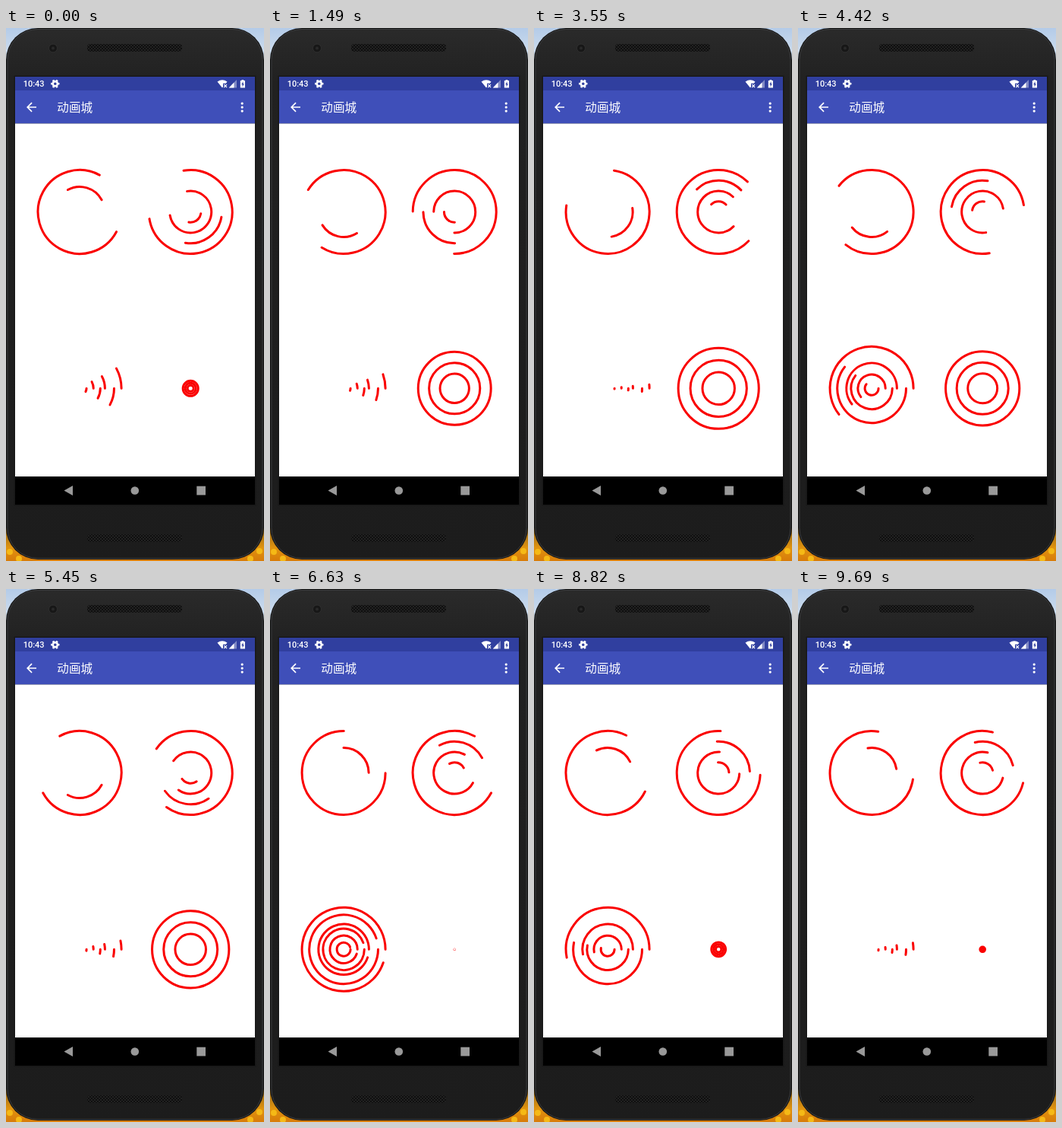
Write an HTML page that moves like this. It is 340 px wide and 700 px high and loops after 9790 ms.

```html
<!DOCTYPE html>
<html lang="zh">
<head>
<meta charset="utf-8">
<title>动画城</title>
<style>
  html, body { margin: 0; width: 100%; height: 100%; overflow: hidden; }
  svg { display: block; width: 340px; height: 700px; }
</style>
</head>
<body>
<svg viewBox="0 0 340 700" xmlns="http://www.w3.org/2000/svg">
  <defs>
    <linearGradient id="backdrop" x1="0" y1="0" x2="0" y2="1">
      <stop offset="0" stop-color="#b4cbe8"/>
      <stop offset=".06" stop-color="#d3e0ee"/>
      <stop offset=".93" stop-color="#7d5a1c"/>
      <stop offset=".975" stop-color="#e0930f"/>
      <stop offset="1" stop-color="#d87c0a"/>
    </linearGradient>
    <linearGradient id="shell" x1="0" y1="0" x2="0" y2="1">
      <stop offset="0" stop-color="#2a2a2a"/>
      <stop offset=".1" stop-color="#212121"/>
      <stop offset="1" stop-color="#1c1c1c"/>
    </linearGradient>
    <pattern id="mesh" width="4" height="4" patternUnits="userSpaceOnUse">
      <rect width="4" height="4" fill="#222"/>
      <circle cx="1" cy="1" r="1" fill="#080808"/>
      <circle cx="3" cy="3" r="1" fill="#080808"/>
    </pattern>
  </defs>

  <rect width="340" height="700" fill="url(#backdrop)"/>
  <g fill="#f5b916">
    <circle cx="5" cy="688" r="4"/><circle cx="17" cy="697" r="4"/>
    <circle cx="334" cy="687" r="4"/><circle cx="322" cy="697" r="4"/>
  </g>
  <rect x="0" y="0" width="340" height="698" rx="42" fill="#161616"/>
  <rect x="2" y="1.5" width="336" height="695" rx="40" fill="url(#shell)" stroke="#3b3c3e"/>
  <rect x="10.5" y="62.5" width="319" height="565" fill="#181818"/>
  <rect x="107" y="21" width="125" height="10" rx="4" fill="url(#mesh)"/>
  <rect x="107" y="665" width="125" height="10" rx="4" fill="url(#mesh)"/>
  <circle cx="62" cy="26.5" r="5.5" fill="#171717" stroke="#303030"/>
  <circle cx="62" cy="26.5" r="2" fill="#292929"/>

  <rect x="12" y="64" width="316" height="18.5" fill="#303f9f"/>
  <rect x="12" y="82" width="316" height="43.5" fill="#3f4fb9"/>
  <rect x="12" y="125.5" width="316" height="464" fill="#fff"/>
  <rect x="12" y="589" width="316" height="37" fill="#000"/>

  <g fill="#fff">
    <text x="22.7" y="77.2" font-size="11" font-weight="500" font-family="Roboto, sans-serif">10:43</text>
    <text x="67.3" y="109.7" font-size="15.6" font-family="'Noto Sans CJK SC', 'Noto Sans CJK', sans-serif">动画城</text>
    <circle cx="64.8" cy="73.2" r="3.1" fill="none" stroke="#fff" stroke-width="2.6"/>
    <circle cx="64.8" cy="73.2" r="4.8" fill="none" stroke="#fff" stroke-width="1.8"
      pathLength="12" stroke-dasharray="1" stroke-dashoffset=".5"/>
    <path d="M278.5 70.5Q285 66 291.5 70.5L289.8 72.8H286V77.2L285 78.5Z"/>
    <path d="M287.3 74.2L291 78M291 74.2L287.3 78" stroke="#fff" stroke-width="1.2"/>
    <path d="M304 68V78.5H293.8Z" opacity=".4"/>
    <path d="M300.5 71.6V78.5H293.8Z"/>
    <path d="M310.5 68H313.2V69H315V78.5H308.8V69H310.5Z"/>
    <path d="M312.5 70.3L310.2 74.3H311.6V77.2L313.8 73.2H312.5Z" fill="#303f9f"/>
    <path transform="translate(23.8 94.3) scale(.81)"
      d="M20 11H7.83l5.59-5.59L12 4l-8 8 8 8 1.41-1.41L7.83 13H20z"/>
    <circle cx="311.2" cy="99.1" r="1.65"/>
    <circle cx="311.2" cy="104.1" r="1.65"/>
    <circle cx="311.2" cy="109.1" r="1.65"/>
  </g>
  <g fill="#999">
    <path d="M76.5 607.5L88 601V614Z"/>
    <circle cx="169.8" cy="607.5" r="5.3"/>
    <rect x="251.3" y="601.7" width="11.7" height="11.7"/>
  </g>
  <g id="stage" fill="none" stroke="#fa0000" stroke-width="3" stroke-linecap="round"></g>
</svg>
<script>
const LOOP = 9790;
const SIZE = 55;
const LEFT = 97.1, RIGHT = 243.2, TOP = 241.5, BOTTOM = 473.3;

// Elapsed playback ms -> step number, and step number -> animator clock in ms.
const STEPS = [[0, 0], [150, 1], [1340, 9], [2390, 16], [3550, 24], [4720, 32],
  [5890, 40], [7060, 48], [8230, 56], [9410, 64], [9690, 66]];
const CLOCK = [[0, 0], [10, 1486], [19, 2850], [30, 4498], [37, 5538], [54, 8103], [66, 9877]];

const stage = document.getElementById('stage');

function interpolate(points, x) {
  let i = 1;
  while (i < points.length - 1 && x >= points[i][0]) i++;
  const [x0, y0] = points[i - 1], [x1, y1] = points[i];
  return y0 + (y1 - y0) * Math.min(1, (x - x0) / (x1 - x0));
}

function add(tag) {
  return stage.appendChild(document.createElementNS('http://www.w3.org/2000/svg', tag));
}

function makeArc(cx, cy, scale) {
  const path = add('path'), r = SIZE * scale;
  const point = deg => {
    const a = deg * Math.PI / 180;
    return (cx + r * Math.cos(a)).toFixed(2) + ' ' + (cy + r * Math.sin(a)).toFixed(2);
  };
  return (start, sweep) => {
    const s = Math.sign(sweep) * Math.max(.1, Math.min(359.9, Math.abs(sweep)));
    path.setAttribute('d', `M${point(start)}A${r} ${r} 0 ${+(Math.abs(s) > 180)} ${+(s > 0)} ${point(start + s)}`);
  };
}

const pair = [1, .6].map(k => makeArc(LEFT, TOP, k));
const quad = [1, .75, .5, .25].map(k => makeArc(RIGHT, TOP, k));
const fans = [1, .825, .605, .495, .33, .163].map(k => makeArc(LEFT, BOTTOM, k));
const ripples = [1, .7, .4].map(k => {
  const circle = add('circle');
  circle.setAttribute('cx', RIGHT);
  circle.setAttribute('cy', BOTTOM);
  return size => circle.setAttribute('r', size * k);
});

const accelerate = x => 360 * x * x;

// Even rings turn clockwise with a long arc, odd rings turn back with a short one.
function spin(arcs, angle) {
  arcs.forEach((arc, i) => i % 2 ? arc(270 - angle, 90) : arc(angle, 270));
}

function draw(time) {
  const step = Math.floor(interpolate(STEPS, time) + .06);
  const clock = interpolate(CLOCK, step);
  const cycles = .281 + clock / 1000;
  const x = cycles % 1;
  const mirrored = Math.floor(cycles) % 2 ? 1 - x : x;

  spin(pair, accelerate(x));
  spin(quad, accelerate((.8506 + clock / 800) % 1));
  fans.forEach((arc, i) => arc(0, accelerate(mirrored) * (i % 2 ? 1 : -1)));
  ripples.forEach(ripple => ripple(SIZE * (1 - Math.cos(Math.PI * x)) / 2));
}

const start = performance.now();
function tick() {
  draw((performance.now() - start) % LOOP);
  requestAnimationFrame(tick);
}
tick();
</script>
</body>
</html>
```
